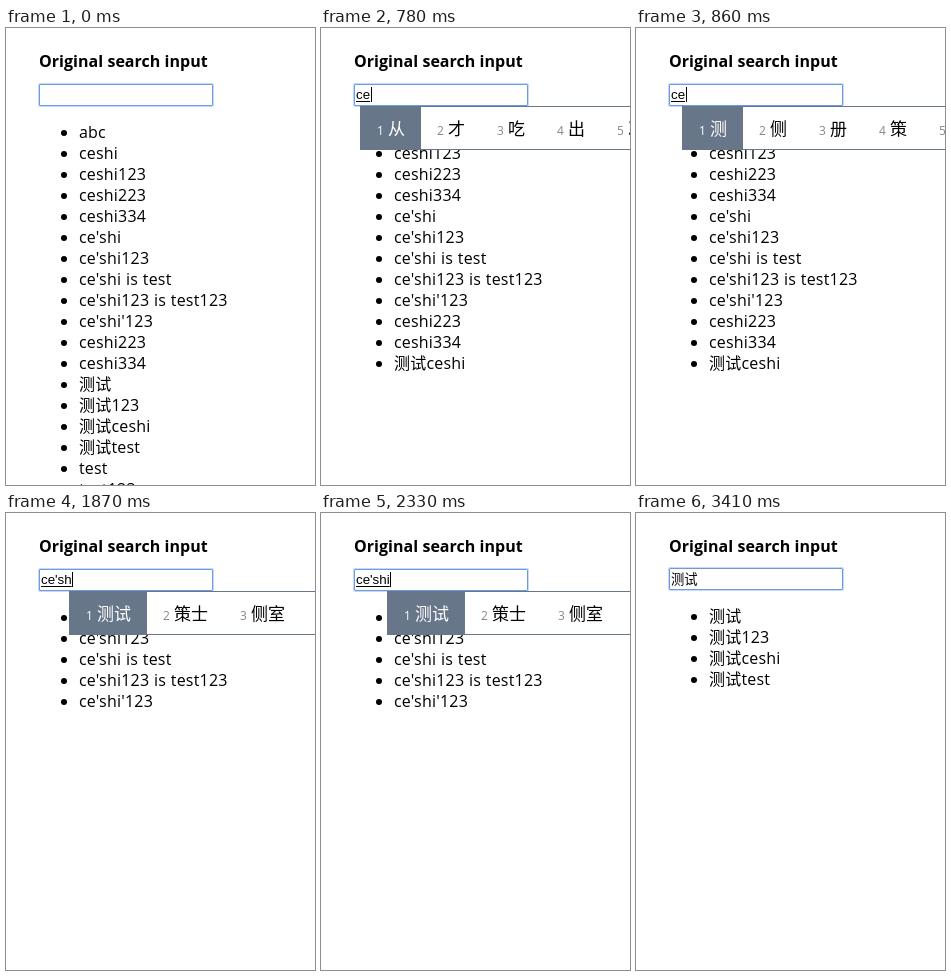
These frames come from a looping animation (309x457 px, 3.64 s). An HTML page:

```html
<!DOCTYPE html>
<html lang="zh-CN">
<head>
<meta charset="utf-8">
<title>Search input</title>
<style>
  html, body { margin: 0; width: 100%; height: 100%; overflow: hidden; background: #fff; }
  body { position: relative; color: #000; font: 16px/21px "Open Sans", "Noto Sans CJK SC", "Noto Sans CJK", sans-serif; }
  h1, ul, #field, #typed, #ime { position: absolute; margin: 0; white-space: nowrap; }
  h1 { left: 33px; top: 23px; font-size: 16px; letter-spacing: .04px; }
  ul { left: 33px; top: 94px; padding-left: 40px; letter-spacing: .2px; word-spacing: .4px; }
  #field { left: 33px; top: 56px; width: 174px; height: 22px; box-sizing: border-box;
    border: 1px solid #6c9be4; border-radius: 1px; box-shadow: 0 0 0 1px rgba(110, 160, 240, .4); }
  #typed { left: 35px; top: 59px; height: 15px;
    font: 13.333px/15px "Liberation Sans", "Noto Sans CJK SC", "Noto Sans CJK", sans-serif; }
  .composing { text-decoration: underline 1px; text-underline-offset: 2px; text-decoration-skip-ink: none; }
  #caret { position: absolute; left: calc(100% + .6px); top: 0; width: 1px; height: 15px; background: #000; }
  #ime { top: 78px; width: 400px; height: 42px; background: #fff; border: 1px solid #68768a;
    font: 17px/42px "Noto Sans CJK SC", "Noto Sans CJK", sans-serif; }
  #ime span { float: left; padding: 0 16px; }
  #ime i { display: inline-block; width: 11px; color: #888; font: 12px/1 "Open Sans", sans-serif; }
  #ime span:first-child, #ime span:first-child i { color: #fff; background: #68768a; }
</style>
</head>
<body>
<h1>Original search input</h1>
<div id="field"></div>
<div id="typed"><span id="text"></span><span id="caret"></span></div>
<ul id="list"></ul>
<div id="ime"></div>
<script>
const LOOP = 3640;
const $ = id => document.getElementById(id);
const words = ["abc", "ceshi", "ceshi123", "ceshi223", "ceshi334", "ce'shi", "ce'shi123",
  "ce'shi is test", "ce'shi123 is test123", "ce'shi'123", "ceshi223", "ceshi334",
  "测试", "测试123", "测试ceshi", "测试test", "test", "test123"];

const forC = { x: 39, options: "从 才 吃 出 次" };
const forCe = { x: 46, options: "测 侧 册 策 厕" };
const forCes = { x: 55, options: "测试 测速 厕所 措施" };
const forShi = x => ({ x, options: "测试 策士 侧室" });

const steps = [
  { at: 0, text: "" },
  { at: 230, text: "c", ime: forC, opacity: .3, caret: true },
  { at: 320, text: "c", ime: forC, caret: true },
  { at: 780, text: "ce", ime: forC, caret: true },
  { at: 860, text: "ce", ime: forCe, caret: true },
  { at: 1320, text: "ce's", ime: forCes, caret: true },
  { at: 1870, text: "ce'sh", ime: forShi(63), caret: true },
  { at: 2330, text: "ce'shi", ime: forShi(66), caret: true },
  { at: 2860, text: "测试", lift: 1, caret: true },
  { at: 3410, text: "测试", lift: 1 }
];

function show({ text, ime, opacity = 1, caret = false, lift = 0 }) {
  $("text").textContent = text;
  $("text").className = ime ? "composing" : "";
  $("caret").hidden = !caret;
  $("list").innerHTML = words.filter(w => w.includes(text)).map(w => `<li>${w}</li>`).join("");
  $("field").style.top = 56 - lift + "px";
  $("list").style.top = 94 - lift + "px";
  $("ime").hidden = !ime;
  if (!ime) return;
  $("ime").style.left = ime.x + "px";
  $("ime").style.opacity = opacity;
  $("ime").innerHTML = ime.options.split(" ")
    .map((option, i) => `<span><i>${i + 1}</i>${option}</span>`).join("");
}

let current;
function tick() {
  const time = performance.now() % LOOP;
  const step = steps.findLast(s => s.at <= time);
  if (step !== current) show(current = step);
  requestAnimationFrame(tick);
}
tick();
</script>
</body>
</html>
```
